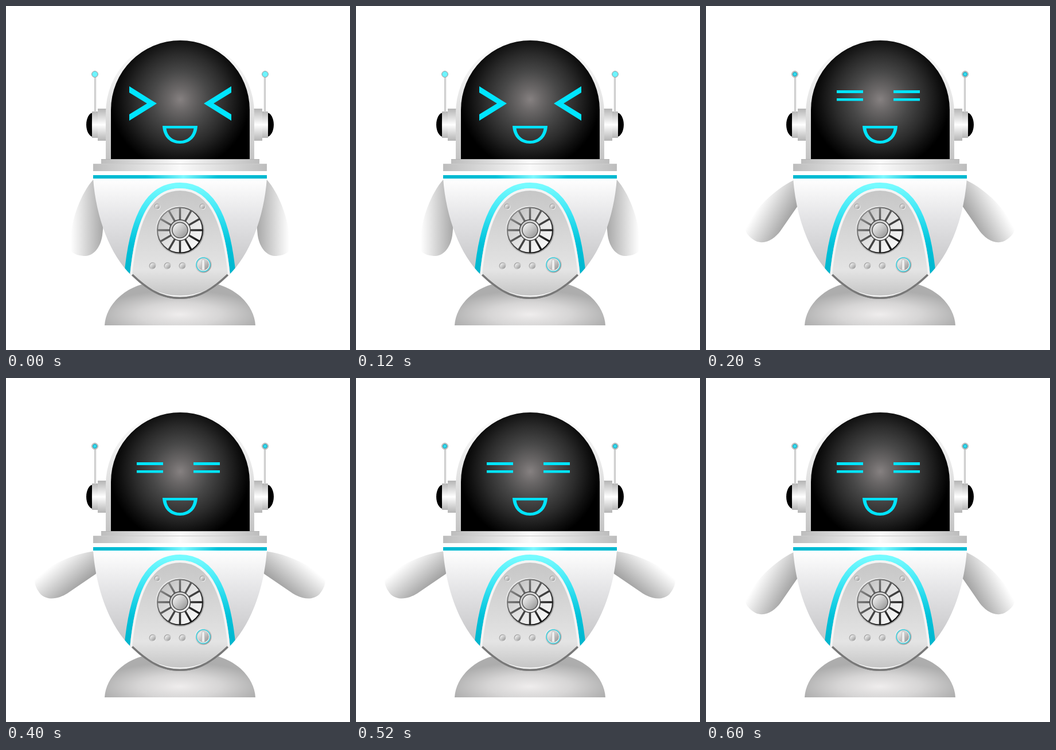
Recreate the animation shown at these times as an HTML page. Size 600x600 px, loop 800 ms.

```html
<!DOCTYPE html>
<html lang="en">
<head>
<meta charset="utf-8">
<title>Waving robot</title>
<style>
  html, body { margin: 0; height: 100%; overflow: hidden; background: #fff; }
  svg { display: block; width: 100vw; height: 100vh; }
</style>
</head>
<body>
<svg viewBox="0 0 600 600">
  <defs>
    <linearGradient id="arm">
      <stop stop-color="#fff"/><stop offset=".25" stop-color="#e8e8e8"/><stop offset="1" stop-color="#a0a0a0"/>
    </linearGradient>
    <linearGradient id="shell" x2="0" y2="1">
      <stop stop-color="#fff"/><stop offset=".5" stop-color="#e6e6e6"/><stop offset="1" stop-color="#c4c4c4"/>
    </linearGradient>
    <radialGradient id="visor" gradientUnits="userSpaceOnUse" cx="304" cy="163" r="122">
      <stop stop-color="#868181"/><stop offset=".16" stop-color="#6b6868"/><stop offset=".4" stop-color="#484848"/>
      <stop offset=".65" stop-color="#2b2b2b"/><stop offset=".85" stop-color="#111"/><stop offset="1"/>
    </radialGradient>
    <linearGradient id="collar">
      <stop stop-color="#bdbdbd"/><stop offset=".5" stop-color="#fafafa"/><stop offset="1" stop-color="#bdbdbd"/>
    </linearGradient>
    <linearGradient id="belt">
      <stop stop-color="#00b8d0"/><stop offset=".3" stop-color="#00c0d8"/><stop offset=".52" stop-color="#7ff8ff"/>
      <stop offset=".72" stop-color="#00c0d8"/><stop offset="1" stop-color="#00b8d0"/>
    </linearGradient>
    <linearGradient id="arch" x2="0" y2="1">
      <stop stop-color="#76fbff"/><stop offset=".3" stop-color="#3ce6f5"/><stop offset=".65" stop-color="#00c2da"/>
      <stop offset="1" stop-color="#00b4cc"/>
    </linearGradient>
    <linearGradient id="torso" x2="0" y2="1">
      <stop stop-color="#fff"/><stop offset=".35" stop-color="#e2e2e4"/><stop offset=".75" stop-color="#c6c6c8"/>
      <stop offset="1" stop-color="#707070"/>
    </linearGradient>
    <linearGradient id="panel" x2="0" y2="1">
      <stop stop-color="#c6c6c6"/><stop offset=".5" stop-color="#dadada"/><stop offset=".75" stop-color="#e4e4e4"/>
      <stop offset="1" stop-color="#c4c4c4"/>
    </linearGradient>
    <radialGradient id="base" cx=".5" cy=".75" r=".55">
      <stop stop-color="#efeded"/><stop offset=".5" stop-color="#d6d5d5"/><stop offset="1" stop-color="#adadad"/>
    </radialGradient>
    <linearGradient id="pipe" x2="0" y2="1">
      <stop stop-color="#b4b4b4"/><stop offset=".5" stop-color="#fff"/><stop offset="1" stop-color="#b4b4b4"/>
    </linearGradient>
    <radialGradient id="cap" cx=".8">
      <stop stop-color="#909090"/><stop offset=".7" stop-color="#161616"/><stop offset="1"/>
    </radialGradient>
    <linearGradient id="lit" x2="1" y2="1"><stop stop-color="#fff"/><stop offset="1" stop-color="#8c8c8c"/></linearGradient>
    <linearGradient id="sunk" x2="1" y2="1"><stop stop-color="#8c8c8c"/><stop offset="1" stop-color="#fff"/></linearGradient>
    <linearGradient id="blade" x2="1" y2="1">
      <stop stop-color="#b8b8b8"/><stop offset=".5" stop-color="#e2e2e2"/><stop offset="1" stop-color="#fff"/>
    </linearGradient>
    <linearGradient id="spoke" gradientUnits="userSpaceOnUse" x1="275" y1="365" x2="332" y2="420">
      <stop stop-color="#858585"/><stop offset="1" stop-color="#111"/>
    </linearGradient>
    <path id="hull" d="M152 301H455C450 370 425 435 388 470C365 492 340 511 303.5 511S242 492 219 470C182 435 157 370 152 301Z"/>
    <clipPath id="inside"><use href="#hull"/></clipPath>

    <g id="side">
      <path class="arm" fill="url(#arm)" d="M152 303C132 325 113 372 113 408V427C119 434 130 436 139 436C158 434 166 414 168 400L174 340L170 306Z"/>
      <ellipse cx="152" cy="207" rx="12" ry="21" fill="url(#cap)"/>
      <g fill="url(#pipe)">
        <rect x="150" y="184" width="11" height="46"/>
        <rect x="160" y="179" width="15" height="56"/>
      </g>
      <path d="M155.5 124V185" stroke="#b5b5b5" stroke-width="3"/>
      <path d="M155.5 124V185" stroke="#f4f4f4"/>
      <circle cx="155" cy="119" r="5.5" fill="#d0d0d0" stroke="#aaa"/>
      <circle class="lamp" cx="155" cy="119"/>
    </g>
  </defs>

  <use href="#base-shape"/>
  <path d="M172 557C174 520 210 485 262 481H345C397 485 433 520 435 557Z" fill="url(#base)"/>
  <use href="#side"/>
  <use href="#side" transform="matrix(-1 0 0 1 607 0)"/>

  <path d="M174 268V186A129.5 129.5 0 0 1 433 186V268Z" fill="url(#shell)"/>
  <path d="M183 267V181A121 121 0 0 1 425 181V267Z" fill="url(#visor)"/>
  <g fill="#00e5ff">
    <path d="M273 209H334C333 228 321 240 303.500 240S274 228 273 209ZM279.500 213.500C281 227 291 235 303.500 235S326 227 327.500 213.500Z" fill-rule="evenodd"/>
    <path id="squint" d="M215 140L263 170L215 200V189L246 170L215 151ZM393 140L345 170L393 200V189L362 170L393 151Z"/>
    <path id="shut" d="M228 147h46v5h-46zm0 14h46v4.500h-46zM327 147h46v5h-46zm0 14h46v4.500h-46z"/>
  </g>

  <rect x="166" y="267" width="276" height="8" fill="url(#collar)"/>
  <path d="M166 267.500H442M152 275.500H455" stroke="#aaa" stroke-opacity=".6"/>
  <rect x="152" y="276" width="303" height="12" fill="url(#collar)"/>

  <use href="#hull" fill="url(#torso)"/>
  <rect x="152" y="295" width="303" height="6" fill="url(#belt)"/>
  <g clip-path="url(#inside)">
    <path d="M211 470C219 385 240 313 303.500 313S388 385 396 470" fill="none" stroke="url(#arch)" stroke-width="10"/>
    <path d="M218 470C226 390 245 320 303.500 320S381 390 389 470C365 492 340 507 303.500 507S242 492 218 470Z"
          fill="url(#panel)" stroke="#f4f4f4" stroke-width="4"/>
    <path d="M219 470C242 492 267 511 303.500 511S365 492 388 470" fill="none" stroke="#787878" stroke-width="7"/>
  </g>

  <circle cx="303.500" cy="391" r="42.500" fill="url(#lit)"/>
  <circle cx="303.500" cy="391" r="39.500" fill="url(#blade)" stroke="url(#spoke)" stroke-width="2"/>
  <g id="spokes" stroke="url(#spoke)" stroke-width="3.500"></g>
  <circle cx="303.500" cy="391" r="18" fill="url(#blade)" stroke="#444" stroke-width="1.500"/>
  <circle cx="303.500" cy="391" r="13.500" fill="url(#lit)" stroke="#555" stroke-width="1.500"/>
  <g id="studs"></g>

  <circle cx="344" cy="451" r="14.500" fill="url(#lit)"/>
  <circle cx="344" cy="451" r="12" fill="url(#blade)" stroke="#35cfdf" stroke-width="1.500"/>
  <circle cx="344" cy="451" r="10" fill="url(#lit)"/>
  <rect x="341.500" y="442" width="5" height="19" rx="2.500" fill="#eee" stroke="#aaa" stroke-width=".6"/>
</svg>
<script>
  const $ = id => document.getElementById(id);
  const arm = document.querySelector('.arm');
  const lamp = document.querySelector('.lamp');
  const swing = [0, 29, 50, 29];

  for (let i = 0; i < 12; i++) {
    const a = i * Math.PI / 6, x = Math.cos(a), y = Math.sin(a);
    $('spokes').innerHTML += `<path d="M${303.5 + 18 * x} ${391 + 18 * y}L${303.5 + 39 * x} ${391 + 39 * y}"/>`;
  }

  const stud = (x, y, r) => {
    $('studs').innerHTML += `<circle cx="${x}" cy="${y}" r="${r}" fill="url(#sunk)"/>
      <circle cx="${x}" cy="${y}" r="${r - 1.5}" fill="url(#lit)"/>`;
  };
  [264, 343].forEach(x => stud(x, 350, 5.5));
  [256, 282, 308].forEach(x => stud(x, 453.5, 6.5));

  function draw(now) {
    const step = Math.floor(now % 800 / 200);
    const happy = step === 0;
    arm.setAttribute('transform', `rotate(${swing[step]} 163 322)`);
    $('squint').setAttribute('visibility', happy ? 'visible' : 'hidden');
    $('shut').setAttribute('visibility', happy ? 'hidden' : 'visible');
    lamp.setAttribute('r', happy ? 4.5 : 3.5);
    lamp.setAttribute('fill', happy ? '#6ff5ff' : '#35dcf0');
    lamp.setAttribute('stroke', happy ? '#5fdce8' : '#0796ad');
    requestAnimationFrame(() => draw(performance.now() - start));
  }
  const start = performance.now();
  draw(0);
</script>
</body>
</html>
```
